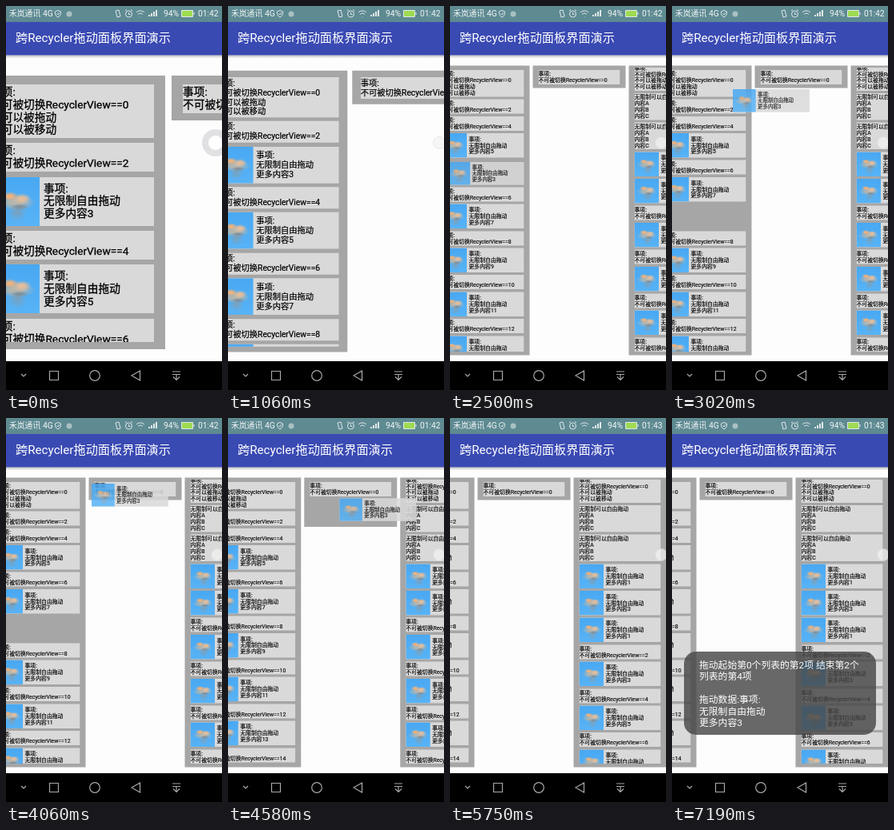
These frames come from a looping animation (270 by 480 pixels, 7320 ms). An HTML page:

```html
<!DOCTYPE html>
<html lang="zh">
<head>
<meta charset="utf-8">
<style>
html, body { margin: 0; width: 100%; height: 100%; overflow: hidden; }
body { position: relative; background: #fdfdfd; color: #000; font-family: Roboto, "Noto Sans CJK SC", "Noto Sans CJK", sans-serif; }
#view { position: absolute; top: 62px; left: 0; width: 270px; height: 382px; overflow: hidden; }
#board, #ghost { position: absolute; left: 0; top: 0; transform-origin: 0 0; }
.col { position: absolute; top: 24.5px; width: 232px; box-sizing: border-box; padding: 5px 14px 9px; background: #a6a6a6; }
.list { overflow: hidden; }
.card { position: relative; width: 204px; margin-top: 6.4px; box-sizing: border-box; background: #d9d9d9; font-size: 13.7px; line-height: 15.7px; white-space: nowrap; overflow: hidden; -webkit-text-stroke: .3px #000; }
.card div:first-child { line-height: 18px; }
.two { height: 36px; }
.four { height: 67px; }
.pic { height: 61px; padding: 7px 0 0 66px; }
.pic div:first-child { line-height: 15.7px; }
.pic::before { content: ""; position: absolute; left: 0; top: 0; width: 61px; height: 61px; background:
  radial-gradient(ellipse 11px 6px at 24px 24px, #efb27c 30%, #efb27c00),
  radial-gradient(ellipse 12px 7px at 39px 27px, #e3bd9c 30%, #e3bd9c00),
  radial-gradient(ellipse 12px 4px at 36px 37px, #7d8f9c 20%, #7d8f9c00),
  radial-gradient(ellipse 25px 9px at 31px 32px, #b5b6ae 30%, #b5b6ae00),
  radial-gradient(ellipse 12px 13px at 33px 43px, #7ba1bb, #7ba1bb00),
  linear-gradient(#48a8f2, #58b3f6); }
.gap { visibility: hidden; }
#ghost .card { margin: 0; }
svg { position: absolute; left: 0; top: 0; }
#toast { position: absolute; left: 15px; top: 292px; width: 240px; height: 104px; box-sizing: border-box; padding: 10px 0 0 19px; border-radius: 15px; background: rgba(70,70,70,.88); color: #fff; font-size: 11.8px; line-height: 14.4px; white-space: pre; }
</style>
</head>
<body>
<div id="view"><div id="board"></div></div>
<svg width="270" height="480" fill="none" stroke="#dfe8ea">
  <linearGradient id="shade" x2="0" y2="1"><stop stop-opacity=".25"/><stop offset="1" stop-opacity="0"/></linearGradient>
  <g stroke="none">
    <path fill="#5e8a92" d="M0 0h270v20H0z"/>
    <path fill="#3a4ab3" d="M0 20h270v41.500H0z"/>
    <path fill="url(#shade)" d="M0 61.500h270v4H0z"/>
    <path fill="#000" d="M0 444h270v36H0z"/>
    <g fill="#f2f6f6" font-size="10.3">
      <text x="4" y="13" font-size="9.8">禾岚通讯</text><text x="46" y="13">4G</text>
      <text x="197" y="13">94%</text><text id="clock" x="240" y="13"></text>
    </g>
    <text x="12" y="45.2" font-size="15.2" fill="#fff">跨Recycler拖动面板界面演示</text>
    <circle cx="79" cy="10" r="3.500" fill="#a9c0c2"/>
    <path fill="#9edb52" d="M220 6h13v7h-13z"/>
    <path fill="#dfe8ea" d="M178 13v-2h2v2zm3 0V9h2v4zm3 0V7h2v6zm3 0V5h2v8z"/>
  </g>
  <path d="M65 14q-4-2-3.500-7l3.500-1.500 3.500 1.500q.5 5-3.500 7zM63.500 9.500l1.500 1.500 2-3M137 6l4-1 2 8-4 1zM149.500 10a4 4 0 1 0 8 0a4 4 0 1 0-8 0M153.500 8v2.500h2M149 6l2-1.500M158 6l-2-1.500M163 8a7 7 0 0 1 10 0M165 10.500a4 4 0 0 1 6 0M168 13v.5M219.500 5.500h14v8h-14zM235 8v3"/>
  <g stroke="#a8a8a8" stroke-width="1.2">
    <path d="M19 460l3 3 3-3M54.500 456.500h11v11h-11zM167.500 456v12l-10.500-6zM208 457h10M208 460.500h10M213 460v7M209 463.500l4 4 4-4"/>
    <circle cx="111" cy="462" r="6.300"/>
  </g>
  <circle id="ball"/>
</svg>
<div id="ghost"></div>
<div id="toast">拖动起始第0个列表的第2项 结束第2个
列表的第4项

拖动数据:事项:
无限制自由拖动
更多内容3</div>
<script>
const LOOP = 7320, STEP = 130;
const $ = id => document.getElementById(id);

const card = (kind, lines) => `<div class="card ${kind}">${lines.map(l => `<div>${l}</div>`).join('')}</div>`;
const fixed = (n, ...more) => card(more.length ? 'four' : 'two', ['事项:', '不可被切换RecyclerView==' + n, ...more]);
const free = n => card('pic', ['事项:', '无限制自由拖动', '更多内容' + n]);
const series = (from, to) => Array.from({length: to - from + 1}, (_, i) => (from + i) % 2 ? free(from + i) : fixed(from + i));

const head = fixed(0, '不可以被拖动', '不可以被移动');
const abc = card('four', ['无限制可以自由拖动', '内容A', '内容B', '内容C']);
const moved = free(3);
const lists = [
  [head, fixed(2), ...series(4, 17)],
  [fixed(0)],
  [head, abc, abc, free(1), free(1), ...series(2, 9)]
];

$('board').innerHTML = lists.map((_, i) => `<div class="col" style="left:${240 * i - 33}px"><div class="list"></div></div>`).join('');
const views = [...document.querySelectorAll('.list')];
$('ghost').innerHTML = moved;

// Moments at which the picture is refreshed
const ticks = [0, 130, 1060, 1190, 1850, 1980];
for (let t = 2240; t <= 6400; t += STEP) ticks.push(t);
ticks.push(7060, 7190);

const last = (keys, t) => keys.filter(k => k[0] <= t).pop();
function tween(keys, t) {
  const a = last(keys, t) || keys[0];
  const b = keys.find(k => k[0] > t);
  if (!b || a === b) return a.slice(1);
  const p = (t - a[0]) / (b[0] - a[0]);
  return a.slice(1).map((v, i) => v + (b[i + 1] - v) * p);
}

const zoom = [[930, 1], [1190, .5]];
const scroll = [[4450, 0], [4970, -33], [5490, -69]];
const path = [[2240, -9, 137], [2370, -7, 152], [2630, 0, 238], [2760, 16, 220], [3020, 76, 104],
  [3280, 94, 91], [4060, 107, 82], [4320, 114, 85], [4970, 177, 123], [5230, 171, 165], [5490, 163, 212], [5620, 162, 217]];
// time, list, position of the moved card
const slots = [[0, 0, 2], [2370, 0, 3], [2500, 0, 4], [2630, 0, 6], [4190, 1, 1],
  [4710, 2, 1], [5100, 2, 2], [5230, 2, 3], [5360, 2, 4]];
const fade = [[6010, 0], [6140, .35], [6270, .8], [6400, 1], [6930, 1], [7190, .92]];

let shown = '';
function fill(list, pos, held) {
  const key = [list, pos, held].join();
  if (key === shown) return;
  shown = key;
  views.forEach((view, i) => {
    const items = [...lists[i]];
    if (i === list) items.splice(pos, 0, held ? moved.replace('pic', 'pic gap') : moved);
    view.innerHTML = items.join('');
  });
  views[2].firstChild.style.marginTop = '-9px'; // this list is scrolled a little
}

function draw(time) {
  const t = ticks.filter(k => k <= time).pop();
  const held = t >= 2240 && t < 5620;
  const [s] = tween(zoom, t), [dx] = tween(scroll, t), [x, y] = tween(path, t);
  const [, list, pos] = last(slots, t);
  fill(list, pos, held);
  $('board').style.transform = `translateX(${dx}px) scale(${s})`;
  for (const v of views) v.style.maxHeight = 382 / s - 54 + 'px';
  $('ghost').style.cssText = `transform:translate(${x}px,${y}px) scale(.47);opacity:${held ? .85 : 0}`;
  $('toast').style.opacity = tween(fade, t)[0];
  $('clock').textContent = t < 5360 ? '01:42' : '01:43';
  const look = t < 130
    ? {cx: 262, cy: 171, r: 13, fill: '#fff', stroke: '#dedee2', 'stroke-width': 8, opacity: .9}
    : {cx: 264, cy: 171, r: 7.5, fill: '#f4f4f4', stroke: '#ddd', 'stroke-width': 1, opacity: .7};
  for (const k in look) $('ball').setAttribute(k, look[k]);
}

const start = performance.now();
function frame() {
  draw((performance.now() - start) % LOOP);
  requestAnimationFrame(frame);
}
frame();
</script>
</body>
</html>
```
